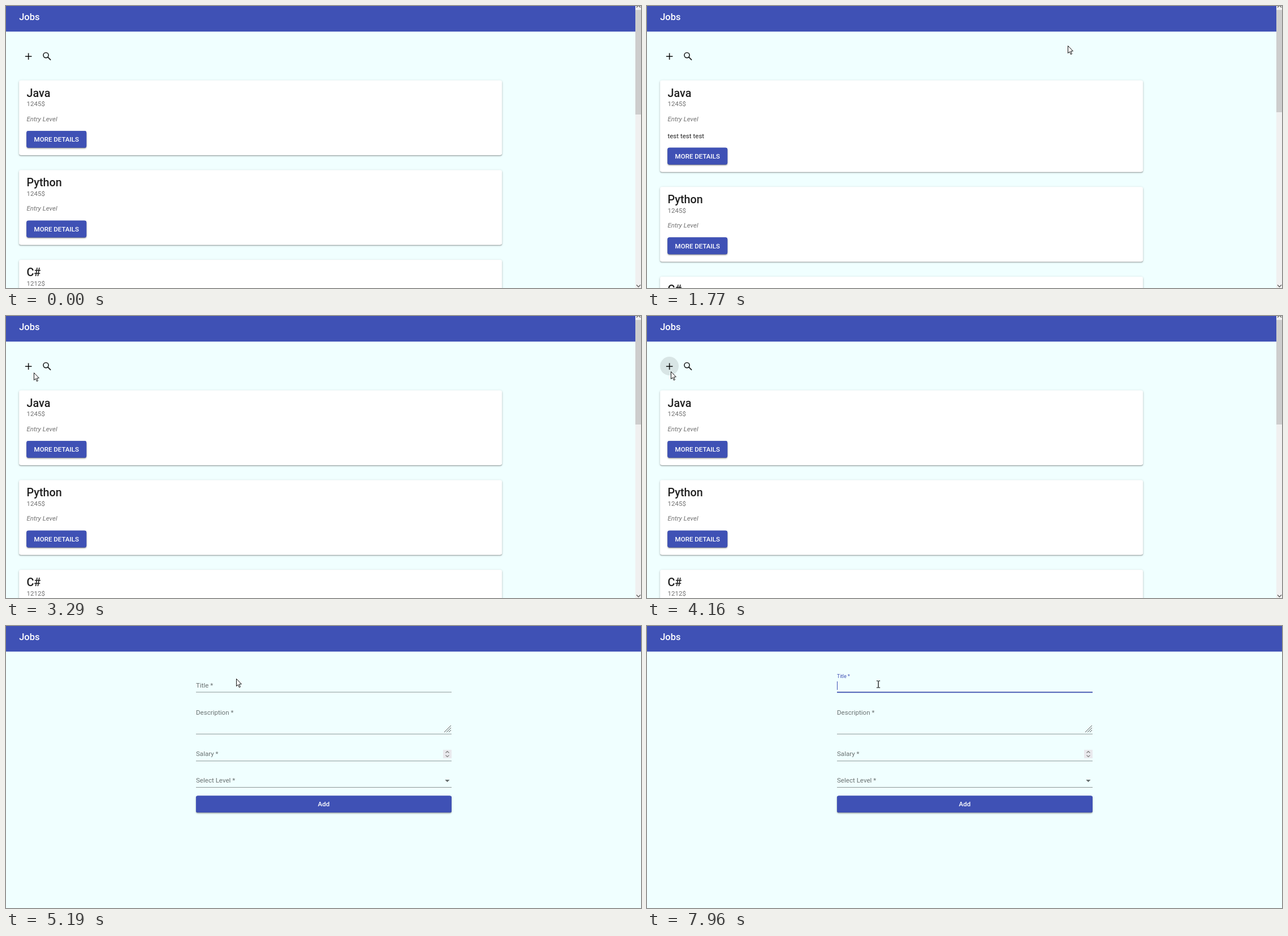
Write an HTML page with a canvas that moves like this. It is 1123 by 499 pixels and loops after 8000 ms.

```html
<!DOCTYPE html>
<html lang="en">
<head>
<meta charset="utf-8">
<title>Jobs</title>
<style>
html, body { margin: 0; width: 100%; height: 100%; overflow: hidden; background: #f0ffff; }
canvas { display: block; }
</style>
</head>
<body>
<canvas id="stage" width="1123" height="499"></canvas>
<script>
const ctx = document.getElementById('stage').getContext('2d');
const W = 1123, H = 499, LOOP = 8000, STEP = 70;
const BLUE = '#3f51b5', DARK = 'rgba(0,0,0,.87)', MUTED = 'rgba(0,0,0,.56)';
const BODY = 11.57, TITLE = 19.83;
const FORM_AT = 4230, FOCUS_AT = 6870;

const jobs = [
  { name: 'Java', pay: '1245$', open: [1490, 1840] },
  { name: 'Python', pay: '1245$', open: [1210, 1420] },
  { name: 'C#', pay: '1212$', open: [0, 0] }
];

// Spans of time in which the pointer moves, one position per STEP.
const moves = [[1140, 1910], [1980, 1980], [2300, 3090], [3150, 3360],
  [3560, 3560], [4770, 5190], [5590, 5800], [6330, 6470]];

// Pointer waypoints: time, x, y.
const path = [
  [1140, 905, 465], [1280, 860, 340], [1350, 838, 275], [1490, 812, 212],
  [1700, 765, 136], [1770, 744, 70], [1840, 450, 28], [1910, 150, 8],
  [1980, 93, 37], [2300, 95, 58], [2440, 99, 90], [2580, 101, 108],
  [2650, 100, 118], [2720, 95, 122], [2860, 84, 117], [3070, 65, 104],
  [3150, 60, 103], [3360, 43, 99], [3560, 42, 98], [4770, 62, 104],
  [4910, 180, 123], [5050, 330, 118], [5190, 407, 93], [5590, 407, 94],
  [5800, 407, 96], [6330, 409, 100], [6470, 409, 103]
];

const within = (t, [a, b]) => t >= a && t < b;
const clamp = v => Math.max(0, Math.min(1, v));
const lerp = (a, b, p) => a + (b - a) * p;
const easeOut = p => 1 - (1 - p) ** 3.4;
const snap = (t, start) => start + Math.floor((t - start) / STEP) * STEP;

function rect(x, y, w, h, color) {
  ctx.fillStyle = color;
  ctx.fillRect(x, y, w, h);
}

function text(str, x, y, size, color, style = '400', align = 'left') {
  ctx.font = `${style} ${size}px Roboto, Arial, sans-serif`;
  ctx.textAlign = align;
  ctx.fillStyle = color;
  ctx.fillText(str, x, y);
}

function line(points, color, width) {
  ctx.beginPath();
  points.forEach(([x, y]) => ctx.lineTo(x, y));
  ctx.strokeStyle = color;
  ctx.lineWidth = width;
  ctx.stroke();
}

function raised(x, y, w, h, color) {
  ctx.save();
  ctx.beginPath();
  ctx.roundRect(x, y, w, h, 3.3);
  ctx.fillStyle = color;
  for (const [dy, blur, alpha] of [[0.8, 4.1, 0.14], [1.4, 1.6, 0.3]]) {
    ctx.shadowColor = `rgba(0,0,0,${alpha})`;
    ctx.shadowOffsetY = dy;
    ctx.shadowBlur = blur;
    ctx.fill();
  }
  ctx.restore();
}

function header(width) {
  rect(0, 0, width, 45.3, BLUE);
  text('Jobs', 23.2, 24.8, 16.53, '#fff', '500');
}

function icons(t) {
  if (t >= 3830) {
    const grow = clamp((Math.min(snap(t, 3830), 4160) - 3760) / 280);
    ctx.beginPath();
    ctx.arc(39.6, 88.6, 16.5 * easeOut(grow), 0, 7);
    ctx.fillStyle = 'rgba(0,0,0,.1)';
    ctx.fill();
  }
  line([[33.9, 89.2], [45.5, 89.2]], DARK, 1.65);
  line([[39.7, 83.4], [39.7, 95]], DARK, 1.65);
  ctx.beginPath();
  ctx.arc(70.6, 87.1, 4.55, 0, 7);
  ctx.stroke();
  line([[73.9, 90.4], [79.1, 95.6]], DARK, 1.85);
}

function card(job, y, open) {
  const drop = open ? 29.75 : 0;
  raised(23.1, y, 854, 132.2 + drop, '#fff');
  text(job.name, 36.4, y + 29, TITLE, DARK, '500');
  text(job.pay, 36.4, y + 45.6, BODY, MUTED);
  text('Entry Level', 36.4, y + 72, BODY, MUTED, 'italic 400');
  if (open) text('test test test', 36.4, y + 101.8, BODY, DARK);
  raised(36.4, y + 89.4 + drop, 105.8, 29.75, BLUE);
  text('MORE DETAILS', 89.3, y + 108.6 + drop, BODY, '#fff', '500', 'center');
  return y + 158.75 + drop;
}

function scrollbar(thumbEnd) {
  rect(1113, 0, 10, H, '#f0f0f0');
  rect(1113, 7, 10, thumbEnd - 7, '#cdcdcd');
  line([[1115, 2.5], [1118.5, -1], [1122, 2.5]], '#606060', 1.3);
  line([[1115, 493.5], [1118.5, 497], [1122, 493.5]], '#606060', 1.3);
}

function jobList(t) {
  header(1113);
  icons(t);
  let y = 131.7, anyOpen = false;
  for (const job of jobs) {
    const open = within(t, job.open);
    anyOpen = anyOpen || open;
    y = card(job, y, open);
  }
  scrollbar(anyOpen ? 188 : 192);
}

function underline(y) {
  rect(336, y, 452, 0.9, 'rgba(0,0,0,.46)');
}

function titleField(t) {
  underline(116.6);
  if (t < FOCUS_AT) {
    text('Title *', 336, 109.3, BODY, MUTED);
    return;
  }
  const age = snap(t, FOCUS_AT) - FOCUS_AT + STEP / 2;
  const p = easeOut(clamp(age / 400)), q = easeOut(clamp(age / 300));
  text('Title *', 336, lerp(109.3, 92.3, p), lerp(BODY, BODY * 0.75, p), BLUE);
  ctx.globalAlpha = q;
  const w = 452 * lerp(0.5, 1, q);
  rect(562 - w / 2, 116.5, w, 1.7, BLUE);
  ctx.globalAlpha = 1;
  if (t < 7430 || t >= 7960) rect(336, 98, 1, 15, BLUE);
}

function form(t) {
  header(W);
  titleField(t);

  text('Description *', 336, 156.6, BODY, MUTED);
  underline(190.7);
  for (const d of [12, 8, 4]) line([[787 - d, 188], [787, 188 - d]], '#555c5c', 1);

  text('Salary *', 336, 230.3, BODY, MUTED);
  underline(238.4);
  rect(773, 219, 15, 15, '#e9e9ed');
  line([[777.5, 224.5], [780.5, 221.8], [783.5, 224.5]], '#777', 1.1);
  line([[777.5, 228.7], [780.5, 231.4], [783.5, 228.7]], '#777', 1.1);

  text('Select Level *', 336, 277.4, BODY, MUTED);
  underline(285);
  ctx.beginPath();
  ctx.moveTo(776.3, 272);
  ctx.lineTo(784.6, 272);
  ctx.lineTo(780.45, 276.2);
  ctx.fillStyle = MUTED;
  ctx.fill();

  raised(336, 300.5, 452, 29.6, BLUE);
  text('Add', 562, 319.3, BODY, '#fff', '500', 'center');
}

function pointerAt(t) {
  const [start, end] = moves.filter(m => m[0] <= t).pop();
  const s = snap(Math.min(t, end), start);
  const i = Math.max(1, path.findIndex(p => p[0] >= s));
  const [a, b] = [path[i - 1], path[i]];
  const p = clamp((s - a[0]) / (b[0] - a[0]));
  return [Math.round(lerp(a[1], b[1], p)), Math.round(lerp(a[2], b[2], p))];
}

function arrow(x, y) {
  ctx.beginPath();
  for (const [dx, dy] of [[0.5, 0.5], [0.5, 13.5], [3.4, 10.8], [5.4, 15.6],
    [7.4, 14.8], [5.4, 10], [9.4, 9.8]]) ctx.lineTo(x + dx, y + dy);
  ctx.closePath();
  ctx.fillStyle = '#fff';
  ctx.fill();
  ctx.strokeStyle = '#111';
  ctx.lineWidth = 1;
  ctx.stroke();
}

function beam(x, y) {
  rect(x - 0.5, y - 6, 1.3, 12.5, '#111');
  for (const dy of [-6.5, 5.5]) {
    rect(x - 3, y + dy, 2.4, 1.1, '#111');
    rect(x + 0.8, y + dy, 2.4, 1.1, '#111');
  }
}

function draw(t) {
  rect(0, 0, W, H, '#f0ffff');
  (t < FORM_AT ? jobList : form)(t);
  if (t >= moves[0][0]) (t < 6330 ? arrow : beam)(...pointerAt(t));
}

const begin = performance.now();
function tick() {
  draw((performance.now() - begin) % LOOP);
  requestAnimationFrame(tick);
}
tick();
</script>
</body>
</html>
```
